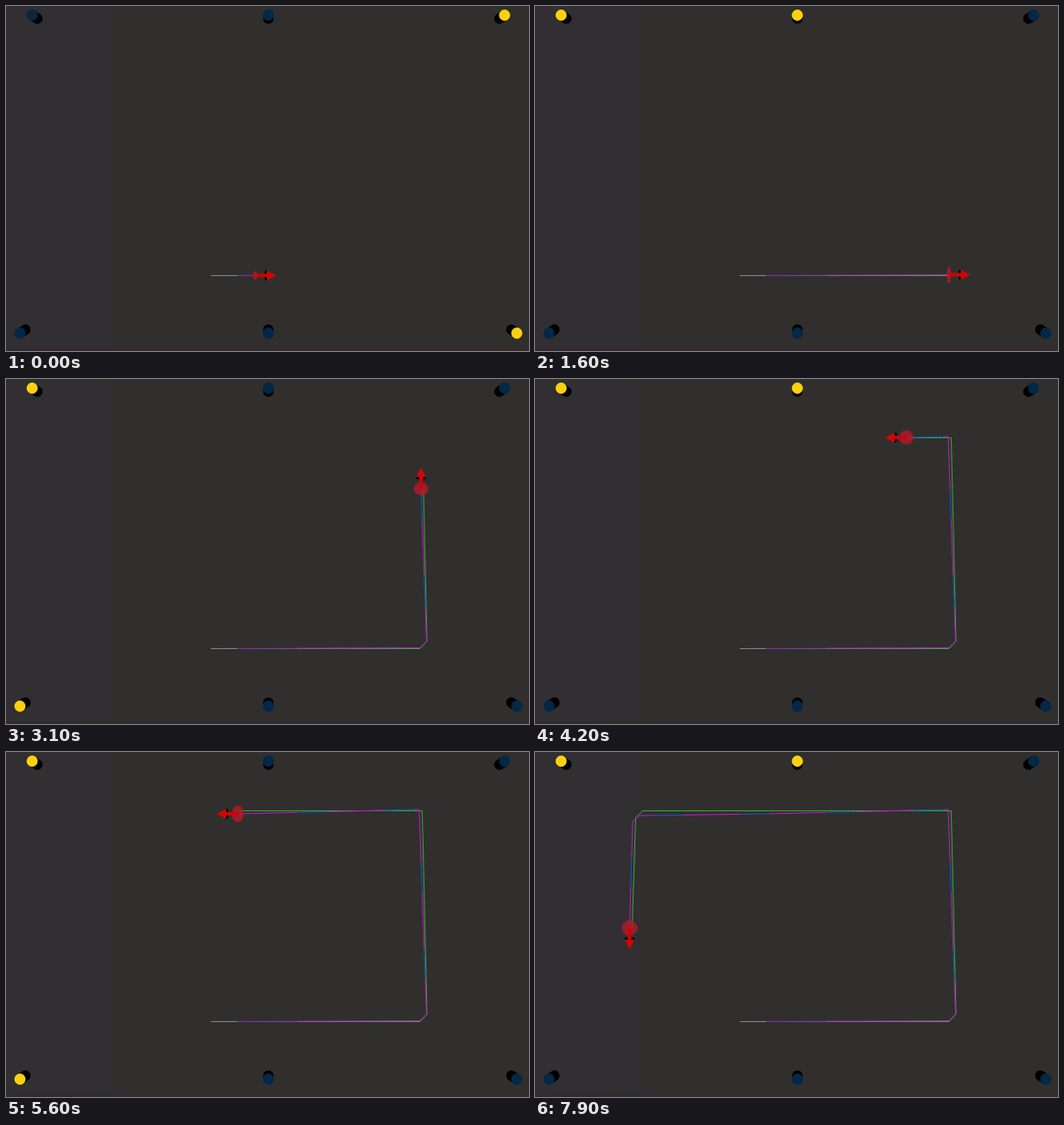
Animation, 600 px wide and 396 px high, one loop 8000 ms. Source, as an HTML page with a canvas:

```html
<!DOCTYPE html>
<html lang="en">
<head>
<meta charset="utf-8">
<title>Beacon navigation</title>
<style>
  html, body { margin: 0; width: 100%; height: 100%; overflow: hidden; background: #302f2d; }
  canvas { display: block; width: 600px; height: 396px; }
</style>
</head>
<body>
<canvas id="stage" width="600" height="396"></canvas>
<script>
const ctx = document.getElementById('stage').getContext('2d');
const LOOP = 8000, STEP = 100;
const PAIR_MS = 1250 / 6;

// Corners of the drive: time, true place, estimated place
const route = [
  { t: -430, truth: [235, 309.5], guess: [235, 309.5] },
  { t: 1600, truth: [475, 309.5], guess: [475, 308.5] },
  { t: 1700, truth: [483, 301], guess: [482.5, 301] },
  { t: 3580, truth: [477.5, 67.5], guess: [474, 66] },
  { t: 3780, truth: [477.5, 67.5], guess: [474, 66] },
  { t: 5600, truth: [266, 67.5], guess: [266, 71] },
  { t: 6690, truth: [123.5, 67.5], guess: [120, 73] },
  { t: 6790, truth: [115.5, 75], guess: [112, 80] },
  { t: 7900, truth: [111.5, 202], guess: [108.5, 202] }
];

const ramp = (t, start, length) => Math.min(1, Math.max(0, (t - start) / length));
const mix = (a, b, k) => a + (b - a) * k;

// The points passed up to time t, ending at the present place
function passed(kind, t) {
  const points = [route[0][kind]];
  for (let i = 1; i < route.length && route[i - 1].t < t; i++) {
    const a = route[i - 1], b = route[i], k = ramp(t, a.t, b.t - a.t);
    points.push([0, 1].map(n => mix(a[kind][n], b[kind][n], k)));
  }
  return points;
}

function line(x1, y1, x2, y2, color, width, cap = 'butt') {
  ctx.strokeStyle = color;
  ctx.lineWidth = width;
  ctx.lineCap = cap;
  ctx.beginPath();
  ctx.moveTo(x1, y1);
  ctx.lineTo(x2, y2);
  ctx.stroke();
}

function oval(x, y, rx, ry, color) {
  ctx.fillStyle = color;
  ctx.beginPath();
  ctx.ellipse(x, y, rx, ry, 0, 0, 7);
  ctx.fill();
}

// Colour of the estimated trail by distance driven: blue stripes after the first leg
function guessColor(d) {
  if (d < 28) return '#858585';
  if (d < 100) return '#8d18bd';
  return d > 240 && (d + 14) % 100 < 35 ? '#1a50d8' : '#c814d8';
}

function trail(points, colorAt) {
  const piece = 5;
  let driven = 0;
  for (let i = 1; i < points.length; i++) {
    const [x, y] = points[i - 1], [x2, y2] = points[i];
    const length = Math.hypot(x2 - x, y2 - y);
    for (let d = 0; d < length; d += piece) {
      const from = d / length, to = Math.min(1, (d + piece) / length);
      line(mix(x, x2, from), mix(y, y2, from), mix(x, x2, to), mix(y, y2, to), colorAt(driven + d), 1);
    }
    driven += length;
  }
}

function floor() {
  const tint = ctx.createLinearGradient(0, 0, 240, 0);
  tint.addColorStop(0, '#312f32');
  tint.addColorStop(0.45, '#312f31');
  tint.addColorStop(0.55, '#302f2d');
  ctx.fillStyle = tint;
  ctx.fillRect(0, 0, 600, 396);
  ctx.fillStyle = '#33292d';
  ctx.fillRect(0, 393, 600, 3);
}

// Six posts leaning out from the centre; neighbouring pairs light up in turn
function drawBeacons(t) {
  const turn = Math.round(t / PAIR_MS) % 6;
  for (let i = 0; i < 6; i++) {
    const top = i < 3;
    const x = 301 + (top ? (1 - i) * 271 : (i - 4) * 285);
    const y = top ? 10.5 : 375.5;
    const lit = i === turn || i === (turn + 5) % 6;
    line(x, y, mix(x, 301, 0.022), mix(y, 193, 0.022), '#000', 12, 'round');
    oval(x, y, 6.4, 6.4, lit ? '#fbd10f' : '#042848');
  }
}

function drawRobot(t, [x, y]) {
  const turns = [ramp(t, 1600, 200), ramp(t, 3580, 140), ramp(t, 6650, 170)];
  const out = ramp(t, 0, 1600), back = ramp(t, 3700, 2900);
  // Uncertainty grows across the direction of travel and is shared out at turns
  const rx = 2.5 + 6 * turns[0] - 2.5 * back + 3 * turns[2];
  const ry = 5 + 5 * out - 2.5 * turns[0] + 3.5 * back - 2 * turns[2];
  oval(x, y, rx, ry, 'rgba(185, 24, 40, .78)');
  ctx.save();
  ctx.translate(x, y);
  ctx.rotate(-Math.PI / 2 * (turns[0] + turns[1] + turns[2]));
  oval(12.5, 0, 2, 6, '#050000');
  line(0, 0, 15, 0, '#c80606', 4);
  ctx.fillStyle = '#d60505';
  ctx.beginPath();
  ctx.moveTo(13.5, -5.5);
  ctx.lineTo(24.5, 0);
  ctx.lineTo(13.5, 5.5);
  ctx.fill();
  ctx.restore();
}

function frame() {
  const t = Math.floor(performance.now() % LOOP / STEP) * STEP;
  const guess = passed('guess', t);
  floor();
  trail(passed('truth', t), () => '#34b028');
  trail(guess, guessColor);
  drawBeacons(t);
  drawRobot(t, guess[guess.length - 1]);
  requestAnimationFrame(frame);
}
frame();
</script>
</body>
</html>
```
